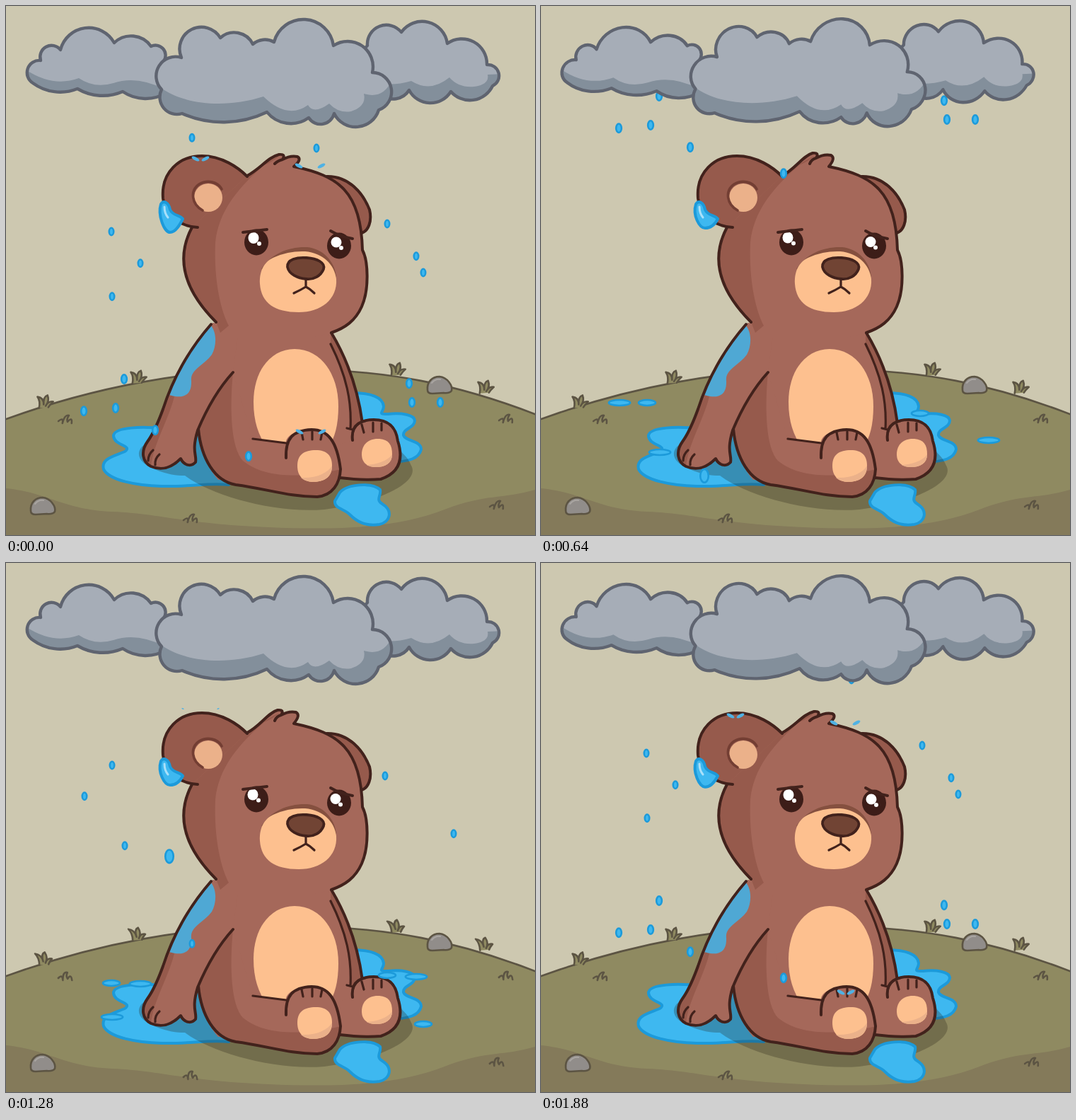
Recreate the animation shown at these times as an HTML page. Size 748 by 748 pixels, loop 1.92 s.

```html
<!DOCTYPE html>
<html lang="en">
<head>
<meta charset="utf-8">
<title>Sad bear in the rain</title>
<style>
html, body { margin: 0; width: 100%; height: 100%; overflow: hidden; background: #cdc8b0; }
svg { display: block; width: 100vw; height: 100vh; }
path { stroke-linecap: round; stroke-linejoin: round; }
.line { fill: none; stroke: #42221c; stroke-width: 4; }
.thin { fill: none; stroke: #42221c; stroke-width: 3.2; }
.fur { fill: #a5685a; }
.dark { fill: #965a4c; }
.peach { fill: #fdc08f; }
.water { fill: #3eb8f0; stroke: #1c9ada; stroke-width: 4; }
.rain { fill: #3eb8f0; stroke: #1c9ada; stroke-width: 2.6; }
.shadow { fill: #281e14; opacity: .27; }
.earth { stroke: #5c5443; stroke-width: 2.6; }
.puff { stroke: #5f6470; stroke-width: 4.4; fill: none; }
</style>
</head>
<body>
<svg viewBox="0 0 748 748">
  <path class="earth" fill="#8f8a61" d="M-5,586C120,540 260,512 400,513S640,535 753,579V760H-5Z"/>
  <path fill="#847a5a" d="M0,682C60,688 80,712 150,715S250,732 370,737S560,735 620,712S700,698 748,684V748H0Z"/>
  <g id="grass"></g>
  <g id="stones"></g>

  <g class="water">
    <path d="M225,598C195,594 152,595 152,608C153,622 180,621 168,630C152,637 134,640 138,655C146,671 185,678 220,679C260,680 285,674 315,677L320,610Z"/>
    <path d="M490,547C515,547 533,553 534,566C534,575 524,577 540,577C560,575 577,578 578,586C578,597 561,597 562,607C565,616 587,614 587,627C584,640 570,644 545,645L490,640Z"/>
  </g>
  <path class="shadow" d="M205,615C180,625 183,645 210,655C230,663 240,664 253,664C290,692 380,718 450,712C540,700 585,670 573,650C568,637 560,632 550,622L300,600Z"/>
  <path class="water" d="M472,688C482,676 518,673 529,684C531,692 522,698 532,704C548,714 543,730 528,733C508,736 496,729 486,719C479,711 464,711 465,700Z"/>

  <!-- torso -->
  <path class="dark" d="M453,241C485,240 505,265 514,288C518,305 512,318 500,322Z"/>
  <path class="line" d="M453,241C485,240 505,265 514,288C518,305 512,318 503,321"/>
  <path class="fur" d="M292,448L459,462C488,510 500,560 504,595L490,668L300,670C275,640 270,610 272,598Z"/>
  <path class="dark" d="M459,462C488,510 500,560 504,595L488,600C490,560 482,520 459,478Z"/>
  <path class="peach" d="M350,560C350,515 375,485 408,485C445,485 470,520 470,566Q470,605 455,625H370Q350,600 350,560Z"/>
  <path class="line" d="M460,462C490,512 500,560 504,590"/>
  <path class="thin" d="M459,478C482,524 489,560 487,598M482,597L494,600"/>
  <!-- feet -->
  <path class="fur" d="M490,614C487,590 505,585 520,585C545,585 552,600 554,615C562,640 560,660 530,669Q505,671 472,667L470,620Z"/>
  <path class="line" d="M490,614C487,590 505,585 520,585C545,585 552,600 554,615C562,640 557,660 530,669Q505,671 472,667"/>
  <path class="peach" d="M503,634C503,618 515,611 528,612C541,613 546,620 546,634C546,646 537,652 523,652C510,652 503,645 503,634Z"/>
  <path fill="#ebb18a" d="M510,649C525,648 540,643 546,634C546,646 537,652 523,652Q515,652 510,649Z"/>
  <path class="fur" d="M272,598C276,640 295,672 325,677C370,683 400,694 440,694C462,692 472,675 473,655C468,615 455,599 432,599C405,600 396,610 396,617L349,612L321,518Z"/>
  <path class="dark" d="M272,598C288,560 308,530 321,518C316,570 318,625 335,643C365,668 420,668 473,655C472,675 462,692 440,694C400,694 370,683 325,677C295,672 276,640 272,598Z"/>
  <path class="line" d="M272,598C276,640 295,672 325,677C370,683 400,694 440,694C462,692 472,675 473,655C468,615 455,599 432,599C405,600 395,612 396,639"/>
  <path class="thin" d="M349,612L396,618M418,603L420,613M433,602V613M447,603L445,613M503,592L506,603M519,589V602M531,590V600"/>
  <path class="peach" d="M412,650C412,634 422,628 438,628C454,628 461,636 461,650C461,665 452,672 436,673C420,673 412,665 412,650Z"/>
  <path fill="#ebb18a" d="M417,667C440,668 455,660 461,650C461,665 452,672 436,673Q424,673 417,667Z"/>
  <!-- near arm -->
  <path class="fur" d="M290,450C255,490 235,530 222,570C214,592 208,605 200,616C190,630 193,645 205,651C222,658 235,652 247,640C252,650 262,652 268,645C270,635 262,630 271,600C290,555 310,530 321,518L330,450Z"/>
  <path class="dark" d="M232,550C224,570 214,597 200,616C190,630 193,645 205,651C208,620 230,585 238,552Z"/>
  <path fill="#4fa8d4" d="M290,452C299,464 297,482 291,493C280,508 260,514 262,530C263,551 250,556 231,550C243,515 265,480 290,452Z"/>
  <path class="line" d="M290,450C255,490 235,530 222,570C214,592 208,605 200,616C190,630 193,645 205,651C222,658 235,652 247,640C252,650 262,652 268,645C270,635 262,630 271,600C290,555 310,530 321,518"/>
  <path class="thin" d="M208,628Q201,634 201,643M217,634Q210,640 211,649"/>

  <!-- head -->
  <path class="dark" d="M271,313C250,312 226,300 222,272C219,235 245,212 277,212C305,212 328,228 341,241Z"/>
  <path class="fur" id="skull"/>
  <path class="dark" d="M297,447C262,412 235,365 263,313L341,240Q362,224 386,212Q378,220 365,225C330,255 300,290 296,335C294,380 301,425 315,452L303,462Z"/>
  <path class="line" id="outline"/>
  <path class="line" d="M271,313C250,312 226,300 222,272C219,235 245,212 277,212C305,212 328,228 341,241"/>
  <circle cx="286" cy="271" r="20" fill="#ebb18a"/>
  <path d="M278,289C262,280 260,261 273,252C285,245 300,249 305,259" fill="none" stroke="#733e33" stroke-width="3.6"/>

  <!-- face -->
  <g fill="#3d1d18"><ellipse cx="354" cy="334" rx="17" ry="18.5"/><ellipse cx="471" cy="339" rx="17" ry="18.5"/></g>
  <g id="shine" fill="#fff">
    <ellipse cx="350" cy="328" rx="7.5" ry="8"/><circle cx="358" cy="336" r="3"/>
    <ellipse cx="467" cy="334" rx="7.5" ry="7.5"/><circle cx="474" cy="342" r="3"/>
  </g>
  <path class="line" d="M335,320Q352,318 369,316M459,318Q472,326 490,329"/>
  <path d="M361,372C375,350 400,340 426,341C447,343 465,360 467,383L415,360Z" fill="#85503f"/>
  <path class="peach" d="M359,393C358,372 367,360 380,355Q400,346 423,347C448,349 465,366 467,386C469,415 445,433 414,433C380,433 361,420 359,393Z"/>
  <path d="M398,369C397,358 412,355 425,356C440,357 452,363 449,372C445,382 435,387 425,386C412,385 400,379 398,369Z" fill="#714434" stroke="#42221c" stroke-width="3.8"/>
  <path class="thin" d="M424,387V397M407,406Q416,402 424,397Q430,400 436,406"/>

  <path class="water" id="drip"/>
  <path d="M224,284Q224,293 229,299" fill="none" stroke="#a9e0fa" stroke-width="3"/>
  <g id="splash" fill="#4fb2e4"></g>
  <g id="rain" class="rain"></g>
  <g id="clouds"></g>
</svg>
<script>
const LOOP = 1920, BEAT = LOOP / 2, STEP = 40;
const $ = id => document.getElementById(id);
const wrap = (t, period) => (t % period + period) % period;
const oval = (x, y, rx, ry, turn = 0) =>
  `<ellipse cx="${x}" cy="${y}" rx="${rx}" ry="${ry}" transform="rotate(${turn} ${x} ${y})"/>`;

// A chain of arcs "x,y,bulge", the bulge being height over chord.
function puffs(text) {
  const arcs = text.split(' ').map(s => s.split(',').map(Number));
  let [x, y] = arcs.at(-1);
  return `M${x},${y}` + arcs.map(([nx, ny, bulge]) => {
    const r = Math.hypot(nx - x, ny - y) * (1 / bulge + 4 * bulge) / 8;
    [x, y] = [nx, ny];
    return `A${r},${r} 0 0 1 ${x},${y}`;
  }).join('') + 'Z';
}

const clouds = [
  ['77,62,.42 153,52,.34 205,57,.23 223,78,.39 228,122,.3 165,121,.15 101,117,.12 38,109,.13 49,77,.4',
    'M25,88Q65,116 103,102Q125,117 152,109Q185,98 225,118V140H20Z'],
  ['559,37,.37 624,53,.34 680,83,.31 688,113,.42 629,121,.27 570,119,.29 530,125,.23 511,56,.3',
    'M525,108Q545,114 573,106Q600,123 627,101Q640,116 662,114Q684,111 681,97L705,96V145H520Z'],
  ['303,45,.47 349,54,.25 379,51,.16 463,56,.41 518,94,.34 527,147,.42 464,152,.34 428,158,.33 369,150,.2 249,152,.11 220,118,.33 248,73,.39',
    'M210,108C240,138 305,147 364,128Q398,161 427,140Q435,154 457,138Q470,152 488,149Q510,142 506,124Q533,132 545,106V180H210Z']
];
$('clouds').innerHTML = clouds.map(([body, shade], i) => {
  const d = puffs(body);
  return `<g><clipPath id="c${i}"><path d="${d}"/></clipPath><path d="${d}" fill="#a6adb7"/>` +
    `<path d="${shade}" fill="#838f9b" clip-path="url(#c${i})"/><path class="puff" d="${d}"/></g>`;
}).join('');

$('stones').innerHTML = ['0 0', '561 -171'].map(at =>
  `<g transform="translate(${at})"><path class="earth" fill="#918d8a" d="M35,714C34,702 42,695 52,695C63,696 71,708 69,715Q66,719 58,718L42,719Q35,719 35,714Z"/>
  <path d="M41,704Q46,698 53,699" fill="none" stroke="#aaa6a2" stroke-width="2"/></g>`).join('');

const hill = x => 510 + 75 * ((x - 400) / 400) ** 2;
const plant = (x, y, d, fill) => ({ x, y, d, fill });
const plants = [
  ...[53, 185, 551, 676].map(x => plant(x, hill(x),
    'M-6,2Q-5,-8 -10,-14Q-1,-13 0,-3Q-2,-14 4,-16Q8,-8 3,-1Q6,-8 13,-7Q9,-3 7,1', '#8f8a61')),
  ...[[83, 588], [260, 728], [706, 587], [693, 709]].map(([x, y]) => plant(x, y,
    'M-9,-1Q-2,-7 -3,2Q-1,-11 5,-9Q2,-4 4,0Q10,-8 10,2', 'none'))
];

// Each shower comes once a beat; "x,y" are the spots where its drops land.
const showers = [
  { lands: 185, spots: '190,595 149,594 580,585 539,583 150,642 590,652' },
  { lands: 505, spots: '111,561 150,561 633,614 536,576 168,631' },
  { lands: 10, spots: '155,581 110,629 614,573 211,656 167,540 343,693 574,573 570,590', size: 1.2 },
  { lands: 447, spots: '263,678', speed: 1.1 },
  { lands: 30, spots: '439,228', speed: .9 },
  { lands: 660, spots: '231,680', speed: .78, size: 1.8, top: 330 }
];

function rain(t) {
  return showers.map(({ lands, spots, speed = 1.25, size = 1, top = 95 }) =>
    spots.split(' ').map((spot, i) => {
      const [x, land] = spot.split(',').map(Number);
      const age = wrap(t - lands - i % 2 * 35, BEAT);
      if (age < 140 && land > 300) return oval(x, land, 3 + age * .09, 4);
      const y = land - (BEAT - age) * speed;
      return y > top ? oval(x, y, 3.2 * size, 5.2 * size) : '';
    }).join('')).join('');
}

// Two leaves of water leap apart and shrink to specks.
function splash(t, x, y, period, start, step) {
  const stage = Math.floor(wrap(t - start, period) / step);
  if (stage > 2) return '';
  const dx = 7 + 9 * stage, dy = 1 - 5 * stage, r = stage < 2 ? 6 : 1.8;
  return oval(x - dx, y + dy, r, r * .4, 28) + oval(x + dx, y + dy, r, r * .4, -28);
}

function draw(now) {
  const t = Math.floor(now % LOOP / STEP) * STEP, half = t % BEAT;

  const lean = t % BEAT < BEAT / 2 ? 0 : .055;
  for (const g of $('clouds').children) g.setAttribute('transform', `matrix(1 0 ${-lean} 1 ${lean * 90} ${-lean * 15})`);

  const sway = half >= 40 && half < 640 ? 8 : -6;
  $('grass').innerHTML = plants.map(({ x, y, d, fill }) =>
    `<path class="earth" transform="translate(${x} ${y}) skewX(${sway})" d="${d}" fill="${fill}"/>`).join('');

  const h = t >= 640 && t < 1720 ? 2 : 0;
  const cheek = 'M297,447C262,412 235,365 263,313', brow = '341,240';
  const crown = `C360,230 370,${214 - h} ${386 - h},${210 - h}Q${396 - h},${209 - h} ${391 - h},${217 - h}` +
    `Q${402 - h},${211 - h} ${412 - h},${213 - h}Q${419 - h},${217 - h} 407,227` +
    'C470,240 502,262 504,345C512,360 514,400 503,425C494,445 480,455 460,462';
  $('skull').setAttribute('d', `${cheek}L${brow}${crown}L430,470H320Z`);
  $('outline').setAttribute('d', `${cheek}M${brow}${crown}M${391 - h},${217 - h}Q${384 - h},${219 - h} 380,223`);
  $('shine').setAttribute('transform', `translate(${-h / 2} ${-h / 4})`);

  // The drip swells until its drop lets go.
  const swell = wrap(half + 120, BEAT);
  const b = 314 + (swell <= 220 ? 17 * (swell / 200) ** 2 : 0);
  $('drip').setAttribute('d', `M219,280C223,274 230,278 232,288C236,297 245,295 250,301C246,309 240,${b} 232,${b}C224,${b} 214,296 219,280Z`);

  $('splash').innerHTML =
    splash(t, 275, 215, 384, 1880, 60) +
    splash(t, 431, 606, 384, 1880, STEP) +
    splash(t, 430, 230, BEAT, 820, 100);
  $('rain').innerHTML = rain(t);
  requestAnimationFrame(() => draw(performance.now() - begin));
}
const begin = performance.now();
draw(0);
</script>
</body>
</html>
```
